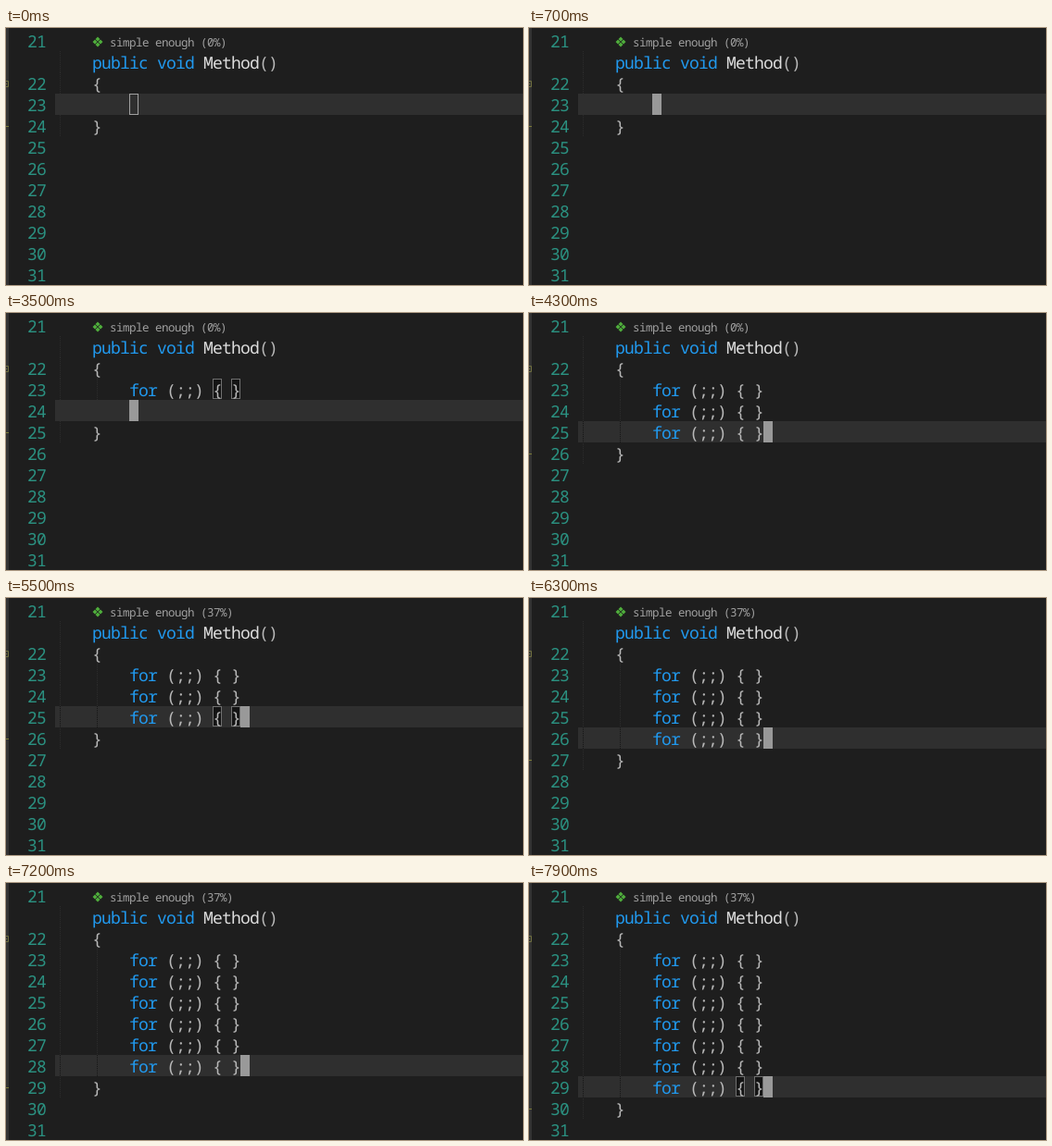
An HTML page that plays this animation: 558 by 278 pixels, repeating every 8000 ms.

```html
<!DOCTYPE html>
<html lang="en">
<head>
<meta charset="utf-8">
<title>Complexity hint in a code editor</title>
<style>
  html, body { margin: 0; width: 100%; height: 100%; overflow: hidden; background: #1e1e1e; }
  svg { display: block; }
  text {
    font: 18px "Noto Sans Mono", "DejaVu Sans Mono", monospace;
    letter-spacing: -0.8px;
    white-space: pre;
    text-rendering: geometricPrecision;
    fill: #b8b8b8;
  }
  .number { fill: #2b9181; }
  .keyword { fill: #2199ee; }
  .method { fill: #dcdcdc; }
  #lens { font-size: 12.5px; letter-spacing: -0.5px; fill: #a0a0a0; }
  .match { fill: #141414; stroke: #707070; }
</style>
</head>
<body>
<svg id="stage" width="558" height="278" viewBox="0 0 558 278">
  <rect width="558" height="278" fill="#1e1e1e"/>
  <rect width="3" height="278" fill="#333"/>
  <rect id="currentLine" x="53" width="505" height="23" fill="#2f2f2f"/>
  <g id="guides"></g>
  <path d="M0 57.5H2.5V63.5H0M0 60.5H1" fill="none" stroke="#707040"/>
  <path id="foldEnd" d="M0 .5H3" stroke="#7c7c38"/>
  <g id="numbers"></g>
  <path id="icon" fill="#4fae3c"/>
  <text id="lens" x="112" y="20"></text>
  <text x="93" y="44"><tspan class="keyword">public void </tspan><tspan class="method">Method</tspan>()</text>
  <text x="93" y="67">{</text>
  <g id="matches">
    <rect class="match" x="223.5" y=".5" width="9" height="21"/>
    <rect class="match" x="243.5" y=".5" width="9" height="21"/>
  </g>
  <g id="loops"></g>
  <text id="closing" x="93">}</text>
  <rect id="caret" height="23"/>
</svg>
<script>
const DURATION = 8000;
const ROW = 23;
const BASELINE = 19;
const MAX_LOOPS = 7;
const FIRST_LINE = 23;

// Each loop statement is inserted, then its braces are matched a moment later.
const inserts = [3200, 3700, 4200, 6200, 6700, 7200, 7700];
const enters = [3500, 4000, 5900, 6500, 7000, 7500];
const MATCH_DELAY = 200;
const LENS_UPDATE = 5200;
const FOCUS = 300;
const BLINK = 500;

const $ = id => document.getElementById(id);
const lineTop = line => 71 + (line - FIRST_LINE) * ROW;
const passed = (times, t) => times.filter(time => time <= t).length;

function add(parent, tag, attrs, html = "") {
  const node = document.createElementNS("http://www.w3.org/2000/svg", tag);
  for (const key in attrs) node.setAttribute(key, attrs[key]);
  node.innerHTML = html;
  parent.appendChild(node);
  return node;
}

function set(node, attrs) {
  for (const key in attrs) node.setAttribute(key, attrs[key]);
}

const show = (node, visible) => set(node, { visibility: visible ? "visible" : "hidden" });

const guide = (x, y) => add($("guides"), "path", {
  d: `M${x}.5 ${y}v${ROW}`, stroke: "#2c2c2c", "stroke-dasharray": "1 1"
});

for (let line = 21; line <= 31; line++) {
  const y = line === 21 ? 21 : lineTop(line) + BASELINE;
  add($("numbers"), "text", { class: "number", x: 23, y }, String(line));
}

guide(58, 25);
guide(58, 48);
const closingGuide = guide(58, 0);

const loops = Array.from({ length: MAX_LOOPS }, (_, i) => {
  const top = lineTop(FIRST_LINE + i);
  return {
    text: add($("loops"), "text", { x: 133, y: top + BASELINE },
      '<tspan class="keyword">for</tspan> (;;) { }'),
    guides: [guide(58, top), guide(98, top)]
  };
});

$("icon").setAttribute("d", [[99, 12], [96, 15], [102, 15], [99, 18]]
  .map(([x, y]) => `M${x} ${y - 2.5}l2.5 2.5l-2.5 2.5l-2.5 -2.5z`).join(""));

function render(t) {
  const inserted = passed(inserts, t);
  const current = passed(enters, t);
  const top = lineTop(FIRST_LINE + current);
  const closingTop = lineTop(FIRST_LINE + current + 1);

  set($("currentLine"), { y: top });
  set($("closing"), { y: closingTop + BASELINE });
  set($("foldEnd"), { transform: `translate(0 ${closingTop + 12})` });
  set(closingGuide, { transform: `translate(0 ${closingTop})` });

  loops.forEach(({ text, guides }, i) => {
    show(text, i < inserted);
    guides.forEach(g => {
      show(g, i < inserted);
      set(g, { stroke: i === current ? "#161616" : "#2c2c2c" });
    });
  });

  // The previous match stays visible until the next statement is inserted.
  const lastInsert = inserts[inserted - 1];
  show($("matches"), inserted > 0 && t >= lastInsert + MATCH_DELAY);
  set($("matches"), { transform: `translate(0 ${lineTop(FIRST_LINE + inserted - 1)})` });

  $("lens").textContent = `simple enough (${t < LENS_UPDATE ? 0 : 37}%)`;

  const focused = t >= FOCUS;
  const lastKey = Math.max(FOCUS, ...[...inserts, ...enters].filter(time => time <= t));
  const x = inserted > current ? 253 : 133;
  show($("caret"), !focused || Math.floor((t - lastKey) / BLINK) % 2 === 0);
  set($("caret"), focused
    ? { x, y: top, width: 10, height: ROW, fill: "#999", stroke: "none" }
    : { x: x + 0.5, y: top + 0.5, width: 9, height: ROW - 1, fill: "none", stroke: "#a0a0a0" });
}

const start = performance.now();
function tick() {
  render((performance.now() - start) % DURATION);
  requestAnimationFrame(tick);
}
tick();
</script>
</body>
</html>
```
